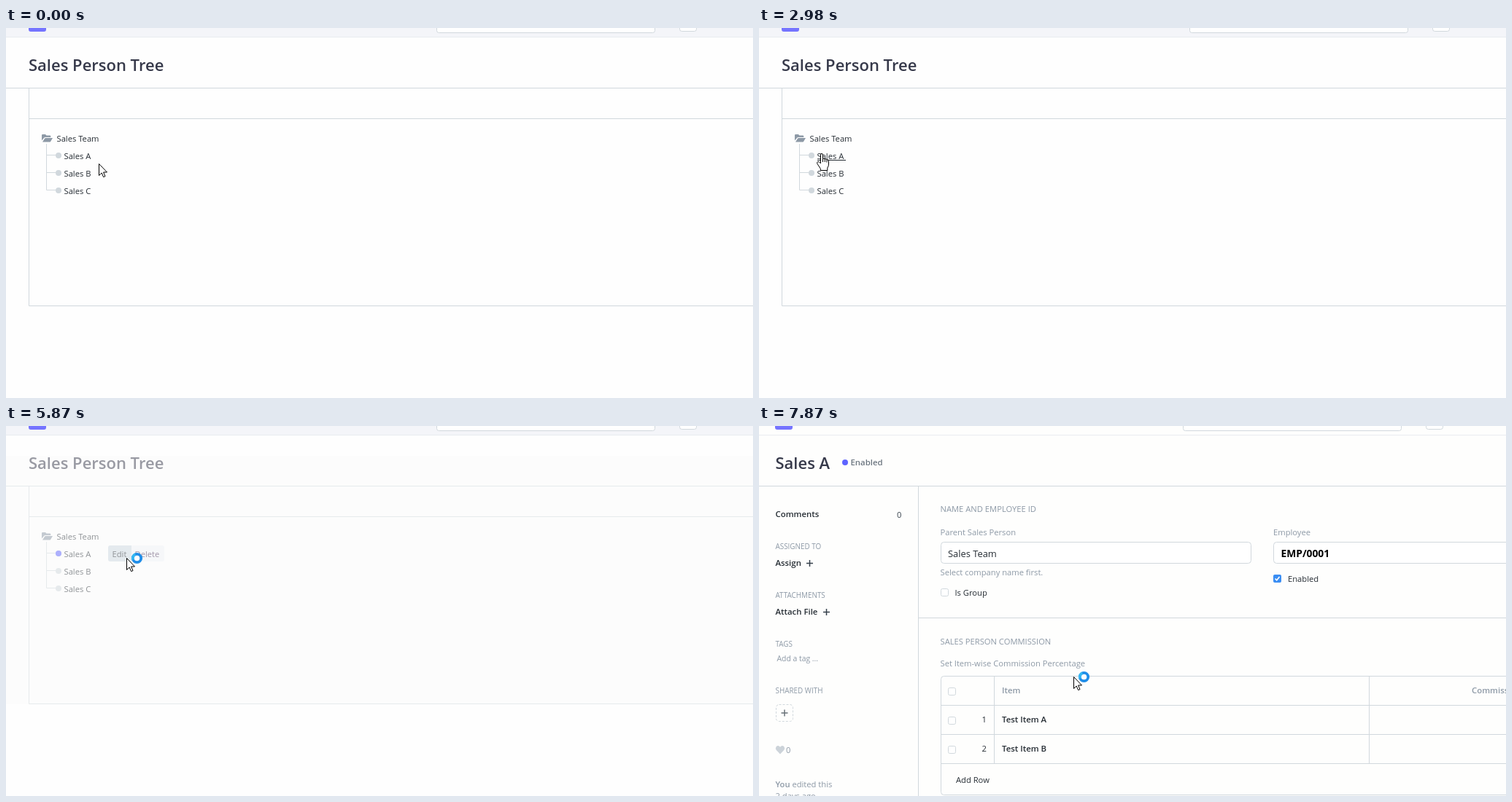
An HTML page that plays this animation: 1024x508 px, repeating every 8000 ms.

```html
<!DOCTYPE html>
<html lang="en">
<head>
<meta charset="utf-8">
<title>Sales Person Tree</title>
<style>
html, body { margin: 0; width: 100%; height: 100%; overflow: hidden; background: #fefefe; }
svg { display: block; width: 1024px; height: 508px; }
text { font: 11.2px "Open Sans", "Noto Sans", sans-serif; fill: #262d34; white-space: pre; }
.title { font-size: 22px; font-weight: 600; fill: #36394a; }
.b { font-size: 11.4px; font-weight: 600; }
.cap { font-size: 9.9px; }
.mid { font-size: 12.9px; }
.g { fill: #8d99a6; }
.line { fill: none; stroke: #d1d8dd; }
.box { fill: #fff; stroke: #d1d8dd; }
.under { stroke: #262d34; }
.plus { stroke: #36414c; stroke-width: 1.5; fill: none; }

#cursor, #cursor g, .under, #picked, #editbg, #tree, #veil, #form { animation: 8s step-end infinite; }
#cursor { animation-name: move; }
#cursor .arrow { animation-name: arrow; }
#cursor .hand { animation-name: hand; }
#cursor .beam { animation-name: beam; }
#cursor .busy, #veil { animation-name: busy; }
#overTeam { animation-name: overTeam; }
#overA { animation-name: overA; }
#overC { animation-name: overC; }
#picked { animation-name: picked; }
#editbg { animation-name: edit; }
#tree { animation-name: fade; }
#form { animation-name: form; }

@keyframes move {
  0% { transform: translate(127px, 186px); }
  1.625% { transform: translate(123px, 185px); }
  8.125% { transform: translate(123px, 184px); }
  9.75% { transform: translate(123px, 183px); }
  14.625% { transform: translate(119px, 196px); }
  16.25% { transform: translate(110px, 222px); }
  17.875% { transform: translate(108px, 246px); }
  19.625% { transform: translate(112px, 224px); }
  21.25% { transform: translate(119px, 165px); }
  23.125% { transform: translate(128px, 113px); }
  25% { transform: translate(181px, 70px); }
  26.625% { transform: translate(178px, 44px); }
  28.25% { transform: translate(178px, 46px); }
  29.875% { transform: translate(150px, 86px); }
  31.5% { transform: translate(80px, 112px); }
  33.125% { transform: translate(72px, 150px); }
  35.375% { transform: translate(86px, 172px); }
  37.5% { transform: translate(98px, 183px); }
  39.125% { transform: translate(104px, 188px); }
  44.125% { transform: translate(104px, 185px); }
  46% { transform: translate(104px, 183px); }
  47.75% { transform: translate(105px, 181px); }
  59.625% { transform: translate(112px, 182px); }
  61.25% { transform: translate(128px, 183px); }
  63% { transform: translate(156px, 182px); }
  64.625% { transform: translate(170px, 181px); }
  66.25% { transform: translate(168px, 181px); }
  70%, 73.375% { transform: translate(165px, 181px); }
  80.25% { transform: translate(465px, 212px); }
  82% { transform: translate(622px, 318px); }
  83.75% { transform: translate(632px, 331px); }
  96.625% { transform: translate(496px, 342px); }
  98.375%, 100% { transform: translate(431px, 344px); }
}
@keyframes arrow {
  0%, 17.875%, 21.25%, 29.875%, 39.125%, 61.25%, 73.375%, 100% { opacity: 1; }
  16.25%, 19.625%, 26.625%, 33.125%, 44.125%, 63% { opacity: 0; }
}
@keyframes hand {
  0%, 17.875%, 21.25%, 39.125%, 61.25%, 73.375%, 100% { opacity: 0; }
  16.25%, 19.625%, 33.125%, 44.125%, 63% { opacity: 1; }
}
@keyframes beam { 0%, 29.875%, 100% { opacity: 0; } 26.625% { opacity: 1; } }
@keyframes busy { 0% { opacity: 0; } 73.375%, 100% { opacity: 1; } }
@keyframes overTeam { 0%, 35.375%, 100% { opacity: 0; } 33.125% { opacity: 1; } }
@keyframes overA { 0%, 39.125%, 61.25%, 100% { opacity: 0; } 35.375%, 44.125% { opacity: 1; } }
@keyframes overC { 0%, 17.875%, 21.25%, 100% { opacity: 0; } 16.25%, 19.625% { opacity: 1; } }
@keyframes picked { 0% { opacity: 0; } 58%, 100% { opacity: 1; } }
@keyframes edit { 0% { opacity: 0; } 63%, 100% { opacity: 1; } }
@keyframes fade { 0% { opacity: 1; } 73.375%, 100% { opacity: .5; } }
@keyframes form { 0% { opacity: 0; } 88.625%, 100% { opacity: 1; } }
</style>
</head>
<body>
<svg viewBox="0 0 1024 508">
  <defs>
    <g id="nav">
      <rect x="31" y="-19" width="24" height="24" rx="3" fill="#7574ff"/>
      <rect class="box" x="590.5" y="-22.5" width="299" height="29" rx="3"/>
      <rect class="box" x="923.5" y="-18.5" width="23" height="23" rx="3"/>
    </g>
    <rect id="check" class="box" x=".5" y=".5" width="10" height="10" rx="2"/>
    <path id="plus" class="plus" d="M-4.5 0H4.5M0-4.5V4.5"/>
  </defs>

  <rect width="1024" height="508" fill="#fefefe"/>
  <rect width="1024" height="12" fill="#f4f5f9"/>
  <path d="M0 12.5H1024" stroke="#e9ecf0"/>
  <use href="#nav"/>
  <rect id="veil" y="41" width="1024" height="341" fill="#fcfcfc"/>

  <g id="tree">
    <text class="title" x="31" y="59">Sales Person Tree</text>
    <path class="line" d="M0 82.5H1024M31.5 83V381.5H1024M31.5 124.5H1024"/>
    <path class="line" d="M55.5 159V222.5H68M55.5 174.5H68M55.5 198.5H68"/>
    <path class="g" d="M49 154.5V147.2Q49 146 50.2 146H54L55.5 147.5H60Q61.3 147.5 61.3 148.8V150H54Q52.6 150 51.8 151.2Z"/>
    <path class="g" d="M50 156.5L53 151.8Q53.5 151 54.5 151H64L61 156Q60.6 156.5 60 156.5Z"/>
    <g fill="#d1d8dd">
      <circle cx="72" cy="175" r="4"/>
      <circle cx="72" cy="199" r="4"/>
      <circle cx="72" cy="223" r="4"/>
    </g>
    <text x="69.5" y="156">Sales Team</text>
    <text x="79.5" y="180">Sales A</text>
    <text x="79.5" y="204">Sales B</text>
    <text x="79.5" y="228">Sales C</text>
    <path id="overTeam" class="under" d="M70 157.5H129"/>
    <path id="overA" class="under" d="M80 181.5H119"/>
    <path id="overC" class="under" d="M80 229.5H118"/>
    <g id="picked">
      <circle cx="72" cy="175" r="4" fill="#5e64ff"/>
      <rect x="140" y="164" width="77" height="22" rx="3" fill="#f0f3f7"/>
      <path id="editbg" d="M143 164H172V186H143Q140 186 140 183V167Q140 164 143 164Z" fill="#cdd9e1"/>
      <text x="145.5" y="180">Edit</text>
      <text x="176.5" y="180" style="fill:#4a3358">Delete</text>
    </g>
  </g>

  <g id="form">
    <rect width="1024" height="508" fill="#fefefd"/>
    <path d="M0 12.5H1024" stroke="#e9ecf0"/>
    <use href="#nav" x="-9"/>
    <path class="line" d="M0 82.5H1024M218.5 83V508M219 263.5H1024"/>
    <text class="title" x="22.5" y="59">Sales A</text>
    <circle cx="118" cy="50" r="4" fill="#5e64ff"/>
    <text class="b" x="125.5" y="54" style="fill:#6c7680">Enabled</text>

    <text class="b" x="22.5" y="125">Comments</text>
    <text x="189" y="126" style="fill:#36414c">0</text>
    <text class="cap g" x="22.5" y="169">ASSIGNED TO</text>
    <text class="b" x="22.5" y="192">Assign</text>
    <use href="#plus" x="69.5" y="188.5"/>
    <text class="cap g" x="22.5" y="236">ATTACHMENTS</text>
    <text class="b" x="22.5" y="259">Attach File</text>
    <use href="#plus" x="92.5" y="255.5"/>
    <text class="cap g" x="22.5" y="303">TAGS</text>
    <text class="g" x="24.5" y="323" style="font-size:10.4px">Add a tag ...</text>
    <text class="cap g" x="22.5" y="367">SHARED WITH</text>
    <rect class="line" x="23.5" y="382.5" width="23" height="23" rx="4" stroke-dasharray="3 2"/>
    <use href="#plus" x="35" y="394" opacity=".75"/>
    <path d="M29 450.5L23.8 445Q22 442.5 23.6 440.2Q26.5 437.5 29 440.8Q31.5 437.5 34.4 440.2Q36 442.5 34.2 445Z" fill="#ccd3d9"/>
    <text class="g" x="37" y="449">0</text>
    <text class="g" x="22.5" y="496"><tspan font-weight="600">You</tspan> edited this</text>
    <text class="g" x="22.5" y="512">2 days ago</text>

    <text class="g" x="248.5" y="118">NAME AND EMPLOYEE ID</text>
    <text class="g" x="248.5" y="150">Parent Sales Person</text>
    <rect class="box" x="249.5" y="159.5" width="425" height="29" rx="4"/>
    <text class="mid" x="259" y="180">Sales Team</text>
    <text class="g" x="248.5" y="205">Select company name first.</text>
    <use href="#check" x="249" y="223"/>
    <text x="268.5" y="233">Is Group</text>
    <text class="g" x="705" y="150">Employee</text>
    <rect class="box" x="705.5" y="159.5" width="425" height="29" rx="4"/>
    <text x="715.5" y="180" style="font-size:13.8px;font-weight:700;fill:#000">EMP/0001</text>
    <rect x="705" y="204" width="11" height="11" rx="2" fill="#3b8ef3"/>
    <path d="M707.5 209.5L709.7 211.8L713.5 207" fill="none" stroke="#fff" stroke-width="1.6"/>
    <text x="725" y="214">Enabled</text>

    <text class="g" x="248.5" y="300">SALES PERSON COMMISSION</text>
    <text class="g" x="248.5" y="330">Set Item-wise Commission Percentage</text>
    <rect class="line" x="249.5" y="343.5" width="900" height="163" rx="4"/>
    <path class="line" d="M249 383.5H1024M249 423.5H1024M249 463.5H1024M322.5 344V463M836.5 344V463"/>
    <use href="#check" x="259" y="359"/>
    <use href="#check" x="259" y="399"/>
    <use href="#check" x="259" y="439"/>
    <text class="b g" x="333" y="367">Item</text>
    <text class="b g" x="977" y="367">Commission</text>
    <text x="305.5" y="407">1</text>
    <text x="305.5" y="447">2</text>
    <text class="b" x="333" y="407">Test Item A</text>
    <text class="b" x="333" y="447">Test Item B</text>
    <text x="270" y="490">Add Row</text>
  </g>

  <g id="cursor" stroke="#000" fill="#fff">
    <g class="arrow">
      <path d="M.5.5V16.5L4.2 13L6.6 18.6L9 17.6L6.6 12H11.5Z"/>
    </g>
    <g class="hand">
      <path d="M-1.5 13.5V2Q-1.5.5 0 .5T1.5 2V7.5Q3 6.2 4.3 8Q6 7 7 8.8Q9.5 8 9.5 11V15Q9.5 18 7.8 20V23.5H-1.5V21.5L-6 14.5Q-7 12.5-5.5 11.6Q-4 11-1.5 13.8ZM1.5 7.5V12M4.3 8V12M7 8.8V12.5" stroke-linejoin="round"/>
    </g>
    <g class="beam">
      <path d="M-3-4.5H-.5L.5-3.5L1.5-4.5H4M.5-4V6M-3 6.5H-.5L.5 5.5L1.5 6.5H4" fill="none"/>
    </g>
    <g class="busy" stroke-width="3.8">
      <circle cx="14.5" cy=".5" r="5.7" stroke="#1f8de8"/>
      <path d="M9.2 2.6A5.7 5.7 0 0 1 12.3-4.8" fill="none" stroke="#35b8f2"/>
    </g>
  </g>
</svg>
</body>
</html>
```
